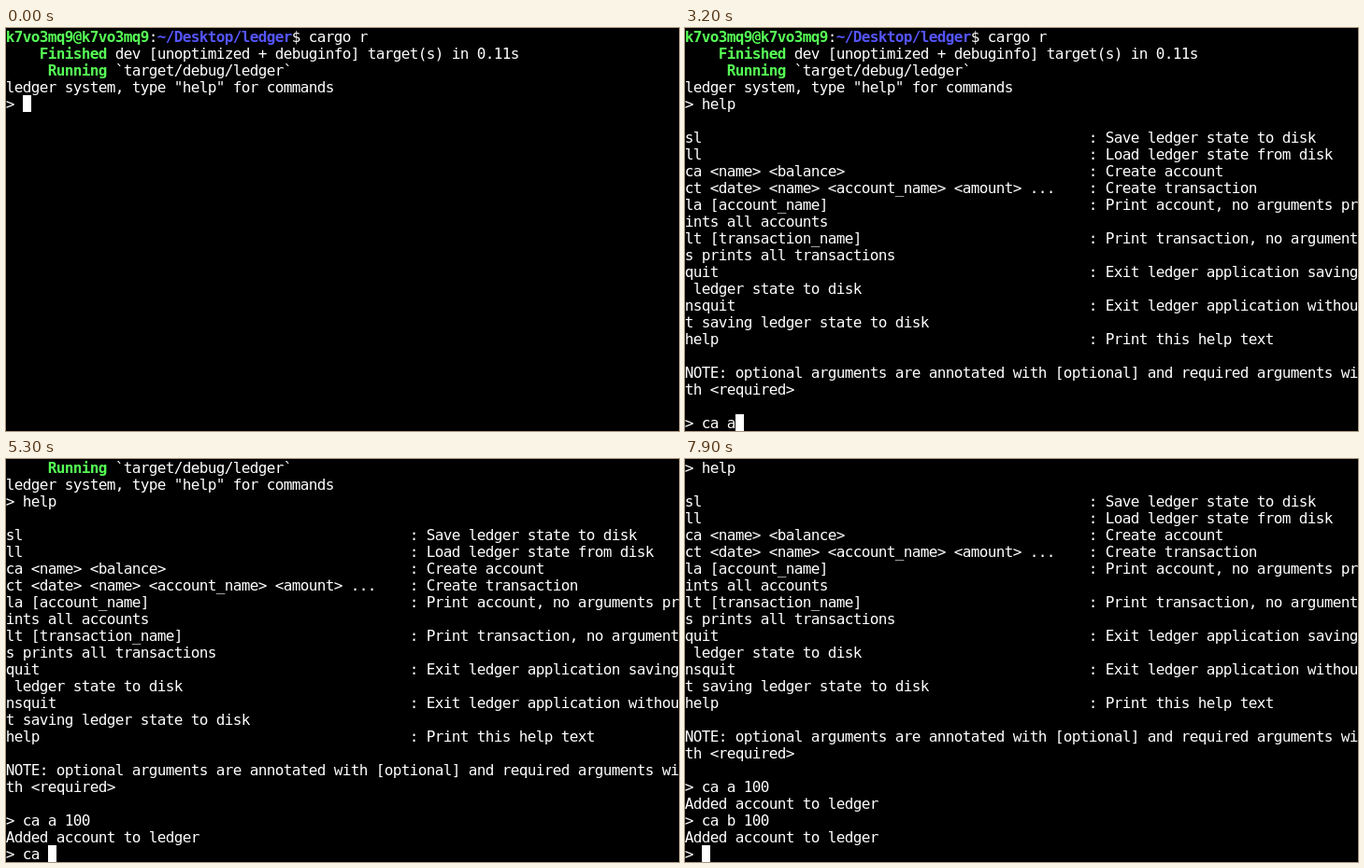
Animation, 720 px wide and 432 px high, one loop 8 s. Source, as an HTML page:

```html
<!DOCTYPE html>
<html lang="en">
<head>
<meta charset="utf-8">
<title>Ledger terminal</title>
<style>
  html, body { margin: 0; width: 100%; height: 100%; overflow: hidden; background: #000; }
  svg { display: block; }
  text { font: 16px "DejaVu Sans Mono", monospace; fill: #fff; white-space: pre; }
  .g { fill: #55ff55; font-weight: bold; }
  .b { fill: #5555ff; font-weight: bold; }
</style>
</head>
<body>
<svg width="720" height="432" viewBox="0 0 720 432">
  <rect width="720" height="432"/>
  <g id="screen"><rect id="cursor" width="9" height="18" fill="#fff"/></g>
</svg>
<script>
const NS = "http://www.w3.org/2000/svg";
const CELL = 9, LINE = 18, COLS = 80, ROWS = 24, BASE = 15, LOOP = 8000;
const screen = document.getElementById("screen");
const cursor = document.getElementById("cursor");

// Every character sits centred in its terminal cell.
const grid = Array.from({ length: COLS }, (_, i) => i * CELL - 0.3).join(" ");

const entry = (cmd, info) => cmd.padEnd(48) + ": " + info;
const wrap = s => s.match(new RegExp(`.{1,${COLS}}`, "g")) || [""];

const help = [
  "",
  entry("sl", "Save ledger state to disk"),
  entry("ll", "Load ledger state from disk"),
  entry("ca <name> <balance>", "Create account"),
  entry("ct <date> <name> <account_name> <amount> ...", "Create transaction"),
  entry("la [account_name]", "Print account, no arguments prints all accounts"),
  entry("lt [transaction_name]", "Print transaction, no arguments prints all transactions"),
  entry("quit", "Exit ledger application saving ledger state to disk"),
  entry("nsquit", "Exit ledger application without saving ledger state to disk"),
  entry("help", "Print this help text"),
  "",
  "NOTE: optional arguments are annotated with [optional] and required arguments with <required>",
  ""
].flatMap(wrap);

// Each line is a string or a list of [text, class] runs.
const intro = [
  [["k7vo3mq9@k7vo3mq9", "g"], [":"], ["~/Desktop/ledger", "b"], ["$ cargo r"]],
  [["    Finished", "g"], [" dev [unoptimized + debuginfo] target(s) in 0.11s"]],
  [["     Running", "g"], [" `target/debug/ledger`"]],
  'ledger system, type "help" for commands'
];
const added = "Added account to ledger";
const blocks = [intro, help, [added], [added]];

const rows = [];
function addLine(line) {
  const el = document.createElementNS(NS, "text");
  el.setAttribute("x", grid);
  el.setAttribute("y", rows.length * LINE + BASE);
  for (const [str, cls] of typeof line === "string" ? [[line]] : line) {
    const run = document.createElementNS(NS, "tspan");
    run.textContent = str;
    if (cls) run.setAttribute("class", cls);
    el.append(run);
  }
  screen.append(el);
  rows.push(el);
}

const prompts = [];
for (const block of blocks) {
  block.forEach(addLine);
  prompts.push(rows.length);
  addLine("> ");
}

// Time, prompt number, typed text, cursor hidden
const steps = [
  [0, 0, ""], [300, 0, "", true], [600, 0, "h"], [800, 0, "hel"], [900, 0, "help"],
  [1900, 1, ""], [2400, 1, "", true], [2600, 1, "c"], [2700, 1, "ca"],
  [3200, 1, "ca a"], [3300, 1, "ca a "], [3700, 1, "ca a 1"], [3800, 1, "ca a 10"],
  [4000, 1, "ca a 100"],
  [4400, 2, ""], [4800, 2, "", true], [5100, 2, "ca"], [5300, 2, "ca "],
  [5600, 2, "ca b"], [5700, 2, "ca b "], [6300, 2, "ca b ", true], [6600, 2, "ca b "],
  [6700, 2, "ca b 1"], [6900, 2, "ca b 10"], [7000, 2, "ca b 100"],
  [7500, 3, ""], [7800, 3, "", true], [7900, 3, ""]
];
const commands = ["help", "ca a 100", "ca b 100", ""];

let shown;
function render(ms) {
  const step = steps.findLast(s => s[0] <= ms);
  if (step === shown) return;
  shown = step;
  const [, active, typed, hidden] = step;
  const last = prompts[active];
  rows.forEach((el, i) => el.setAttribute("visibility", i <= last ? "visible" : "hidden"));
  prompts.forEach((row, i) => {
    rows[row].firstChild.textContent = "> " + (i === active ? typed : commands[i]);
  });
  cursor.setAttribute("x", (2 + typed.length) * CELL);
  cursor.setAttribute("y", last * LINE);
  cursor.setAttribute("visibility", hidden ? "hidden" : "visible");
  const scroll = Math.max(0, last + 1 - ROWS);
  screen.setAttribute("transform", `translate(0 ${-scroll * LINE})`);
}

const start = performance.now();
function tick() {
  render((performance.now() - start) % LOOP);
  requestAnimationFrame(tick);
}
tick();
</script>
</body>
</html>
```
